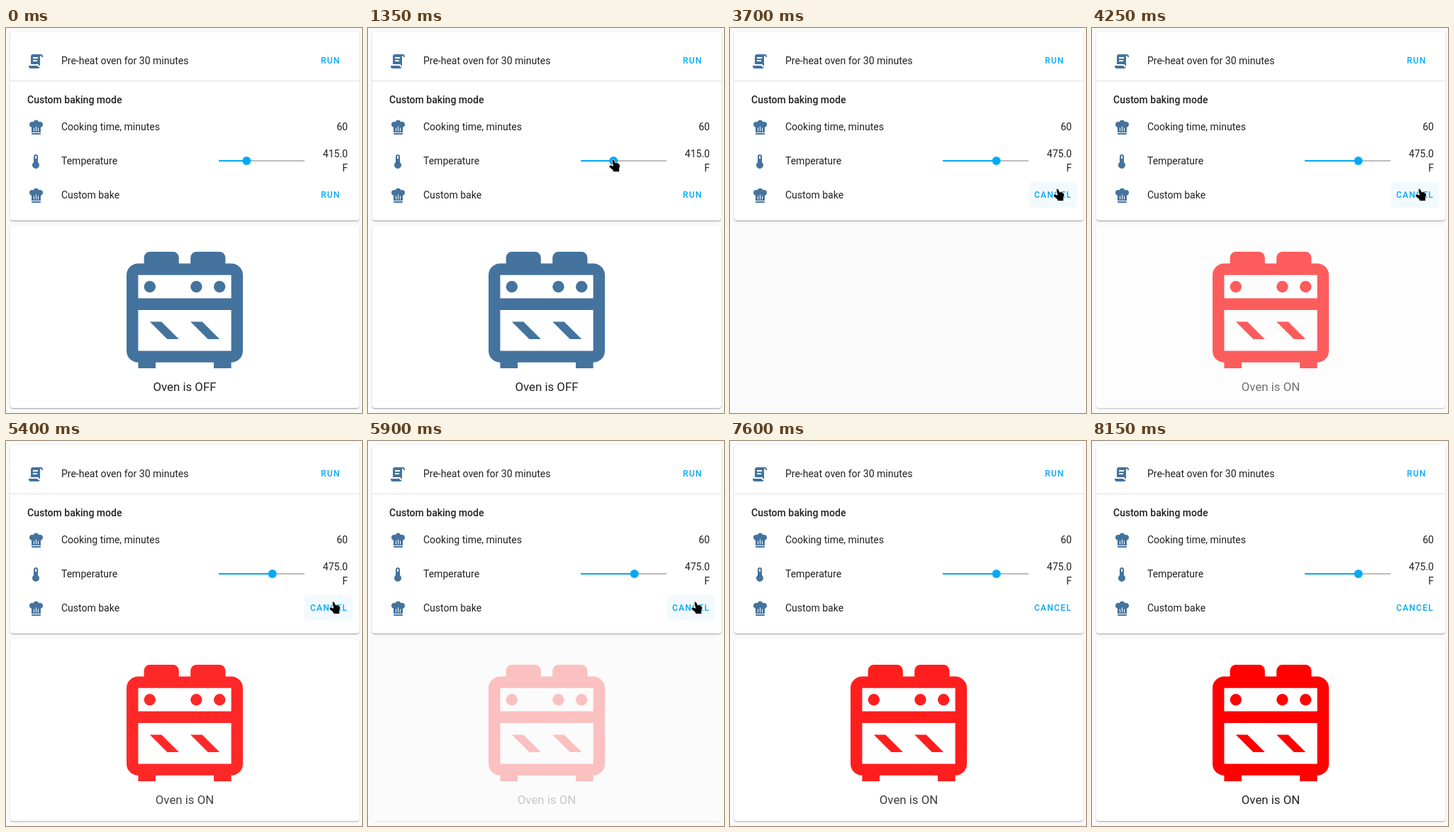
Recreate the animation shown at these times as an HTML page. Size 502x542 px, loop 8.2 s.

```html
<!DOCTYPE html>
<html lang="en">
<head>
<meta charset="utf-8">
<title>Oven control</title>
<style>
  html, body { margin: 0; width: 100%; height: 100%; overflow: hidden; background: #fafafa; }
  svg { display: block; width: 502px; height: 542px; }
  text { font: 14px Roboto, Arial, sans-serif; fill: #212121; }
  .card { fill: #fff; filter: drop-shadow(0 1px 0 rgba(0, 0, 0, .22)) drop-shadow(0 1px 1.5px rgba(0, 0, 0, .16)); }
  .title { font-weight: 500; }
  .end { text-anchor: end; }
  .action { font-size: 12px; font-weight: 500; letter-spacing: 1.25px; }
  .action, .accent { fill: #03a9f4; }
  .state { font-size: 16.8px; text-anchor: middle; }
  .icon { fill: #44739e; }
  .on { fill: #f00; }
  .pointer { fill: #000; stroke: #fff; stroke-width: .8; stroke-linejoin: round; }
  #fill { transform-origin: 300px 187px; }
</style>
</head>
<body>
<svg viewBox="0 0 502 542">
  <defs>
    <path id="script" d="M17.8 20C17.4 21.2 16.3 22 15 22H5C3.3 22 2 20.7 2 19V18H14.2C14.6 19.2 15.7 20 17 20H17.8M19 2C20.7 2 22 3.3 22 5V6H20V5C20 4.4 19.6 4 19 4S18 4.4 18 5V18H17C16.4 18 16 17.6 16 17V16H5V5C5 3.3 6.3 2 8 2H19M8 6V8H15V6H8M8 10V12H14V10H8Z"/>
    <path id="hat" d="M12.5 1.5C10.73 1.5 9.17 2.67 8.67 4.37C8.14 4.13 7.58 4 7 4A4 4 0 0 0 3 8C3 9.82 4.24 11.41 6 11.87V19H19V11.87C20.76 11.41 22 9.82 22 8A4 4 0 0 0 18 4C17.42 4 16.86 4.13 16.33 4.37C15.83 2.67 14.27 1.5 12.5 1.5M12 10.5H13V17.5H12V10.5M9 12.5H10V17.5H9V12.5M15 12.5H16V17.5H15V12.5M6 20V21A1 1 0 0 0 7 22H18A1 1 0 0 0 19 21V20H6Z"/>
    <path id="thermo" d="M15 13V5A3 3 0 0 0 9 5V13A5 5 0 1 0 15 13M12 4A1 1 0 0 1 13 5V8H11V5A1 1 0 0 1 12 4Z"/>
    <g id="stove">
      <path fill-rule="evenodd" d="M4 4H5V3A1 1 0 0 1 6 2H10A1 1 0 0 1 11 3V4H13V3A1 1 0 0 1 14 2H18A1 1 0 0 1 19 3V4H20A2 2 0 0 1 22 6V19A2 2 0 0 1 20 21V22H17V21H7V22H4V21A2 2 0 0 1 2 19V6A2 2 0 0 1 4 4M4 6V10H20V6ZM4 12V19H20V12Z"/>
      <circle cx="6" cy="8" r="1"/><circle cx="14" cy="8" r="1"/><circle cx="18" cy="8" r="1"/>
      <path d="M6 14H8L11 17H9ZM13 14H15L18 17H16Z"/>
    </g>
  </defs>

  <rect class="card" x="6" y="6" width="492" height="265" rx="4"/>
  <rect x="6" y="74" width="492" height="1" fill="#e0e0e0"/>

  <g class="icon">
    <use href="#script" x="30" y="35"/>
    <use href="#hat" x="30" y="128"/>
    <use href="#thermo" x="30" y="176"/>
    <use href="#hat" x="30" y="224"/>
  </g>

  <text x="78" y="51">Pre-heat oven for 30 minutes</text>
  <text x="444" y="50" class="action">RUN</text>
  <text x="30" y="106" class="title">Custom baking mode</text>
  <text x="78" y="144">Cooking time, minutes</text>
  <text x="482" y="144" class="end">60</text>
  <text x="78" y="192">Temperature</text>
  <text x="78" y="240">Custom bake</text>

  <rect x="300" y="186" width="121" height="2" fill="#bdbdbd"/>
  <rect id="fill" class="accent" x="300" y="186" width="75.6" height="2"/>
  <circle id="knob" class="accent" cx="300" cy="187" r="6"/>
  <text id="before" x="482" y="182" class="end">415.0</text>
  <text id="after" x="482" y="182" class="end">475.0</text>
  <text x="482" y="202" class="end">F</text>

  <rect id="hover" x="421" y="217" width="68" height="36" rx="4" fill="#f2fafe"/>
  <text id="run" x="444" y="239" class="action">RUN</text>
  <text id="cancel" x="429" y="239" class="action">CANCEL</text>

  <g id="oven">
    <rect class="card" x="6" y="279" width="492" height="256" rx="4"/>
    <g id="idle">
      <use href="#stove" class="icon" transform="translate(153.6 298.6) scale(8.2)"/>
      <text x="252" y="511" class="state">Oven is OFF</text>
    </g>
    <g id="hot">
      <use href="#stove" class="on" transform="translate(153.6 298.6) scale(8.2)"/>
      <text x="252" y="511" class="state">Oven is ON</text>
    </g>
  </g>

  <g id="cursor" class="pointer">
    <path id="arrow" d="M0 0V16L3.8 12.6L6.5 18.6L9.2 17.4L6.5 11.6H11.5Z"/>
    <path id="hand" d="M-2 -.5Q-1 -2.5 1 -1.2L3 3Q5 2 6.5 3.2Q9 3.8 9.5 7L8.5 11V15.5H0L-1 13L-6 8.8Q-6.5 5.6 -3.5 6L-.5 7.2Z"/>
  </g>
</svg>
<script>
  const LOOP = 8200;
  const START = 3700;
  const BLINK = 3000;
  const DROP = 2050;
  const byId = id => document.getElementById(id);

  // Each step is [time, value, easing towards the next step].
  function play(id, prop, steps) {
    const keys = steps.map(([time, value, easing = 'linear']) =>
      ({ offset: time / LOOP, [prop]: value, easing }));
    byId(id).animate(keys, { duration: LOOP, iterations: Infinity });
  }

  // Hard switches: visible only inside the given spans.
  function show(id, ...spans) {
    const steps = spans[0][0] > 0 ? [[0, 0, 'step-end']] : [];
    for (const [from, to] of spans) {
      steps.push([from, 1, 'step-end'], [to, to < LOOP ? 0 : 1, 'step-end']);
    }
    if (steps.at(-1)[0] < LOOP) steps.push([LOOP, 0]);
    play(id, 'opacity', steps);
  }

  const dragged = (a, b) => [
    [0, a], [1050, a, 'ease-in-out'], [DROP, b], [LOOP, b]
  ];
  play('knob', 'transform', dragged('translateX(39.3px)', 'translateX(75.6px)'));
  play('fill', 'transform', dragged('scaleX(.52)', 'scaleX(1)'));

  show('before', [0, DROP]);
  show('after', [DROP, LOOP]);
  show('run', [0, START]);
  show('cancel', [START, LOOP]);
  show('idle', [0, START]);
  show('hot', [START, LOOP]);
  show('hover', [3200, 6250]);

  play('oven', 'opacity', [
    [0, 1], [START, 1], [START, 0, 'ease'],
    [START + BLINK / 2, 1, 'ease'], [START + BLINK, 0, 'ease'], [LOOP, 1]
  ]);

  const move = (x, y) => `translate(${x}px, ${y}px)`;
  play('cursor', 'transform', [
    [0, move(510, 330)], [250, move(510, 330), 'ease-in-out'],
    [900, move(339, 187)], [1050, move(339, 187), 'ease-in-out'],
    [DROP, move(376, 187)], [2150, move(376, 187), 'ease-in-out'],
    [2550, move(456, 143)], [2700, move(456, 143), 'ease-in-out'],
    [3300, move(462, 228)], [6100, move(462, 228), 'ease-in'],
    [6500, move(520, 270)], [LOOP, move(520, 270)]
  ]);
  show('arrow', [0, 850], [2200, 3200], [6250, LOOP]);
  show('hand', [850, 2200], [3200, 6250]);
</script>
</body>
</html>
```
